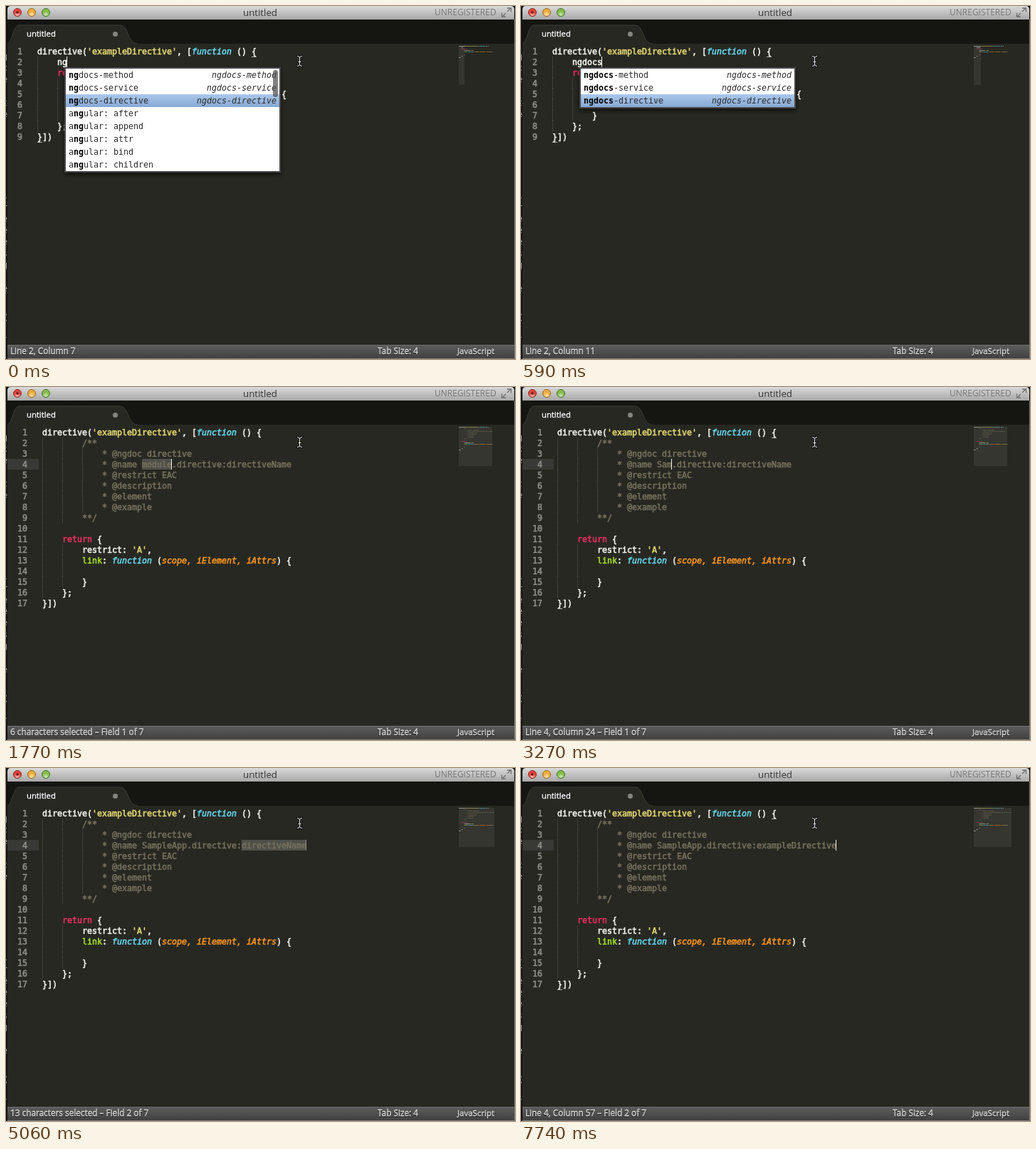
Write an HTML page that moves like this. It is 715 px wide and 496 px high and loops after 8000 ms.

```html
<!DOCTYPE html>
<html lang="en">
<head>
<meta charset="utf-8">
<title>untitled</title>
<style>
  html, body { margin: 0; width: 100%; height: 100%; overflow: hidden; background: #111; }
  svg { display: block; width: 715px; height: 496px; }
  text { white-space: pre; }
  .ui { font-family: "Open Sans", "Noto Sans", sans-serif; }
  .mono { font: 11.63px "DejaVu Sans Mono", monospace; }
  .code text { stroke-width: .55px; }
  .plain { fill: #f8f8f2; stroke: #f8f8f2; }
  .str { fill: #e6db74; stroke: #e6db74; }
  .func { fill: #66d9ef; stroke: #66d9ef; font-style: italic; }
  .key { fill: #ee2f63; stroke: #ee2f63; }
  .name { fill: #a6e22e; stroke: #a6e22e; }
  .arg { fill: #fd971f; stroke: #fd971f; font-style: italic; }
  .note { fill: #75715e; stroke: #75715e; }
  .num { fill: #8f908a; stroke: #8f908a; }
  .bright { fill: #fff; stroke: #fff; stroke-width: .3px; }
  .status { font-size: 11.8px; text-shadow: 0 1px 1px #222; }
  .match { font-weight: bold; fill: #000; }
  .map rect { stroke: none; opacity: .45; }
</style>
</head>
<body>
<svg viewBox="0 0 715 496">
  <defs>
    <linearGradient id="bar" x2="0" y2="1"><stop stop-color="#d9d9d9"/><stop offset="1" stop-color="#a8a8a8"/></linearGradient>
    <linearGradient id="foot" x2="0" y2="1"><stop stop-color="#5d5d5d"/><stop offset="1" stop-color="#414141"/></linearGradient>
    <linearGradient id="pick" x2="0" y2="1"><stop stop-color="#abc8ea"/><stop offset="1" stop-color="#86a8d4"/></linearGradient>
    <radialGradient id="gloss" cy=".85"><stop stop-color="#fff" stop-opacity=".65"/><stop offset="1" stop-color="#fff" stop-opacity="0"/></radialGradient>
    <filter id="shade" x="-10%" y="-10%" width="120%" height="130%"><feDropShadow dx="0" dy="3" stdDeviation="3" flood-opacity=".6"/></filter>
    <clipPath id="edge"><path d="M0 0h2v496H0z"/></clipPath>
  </defs>

  <rect width="715" height="496" fill="#111"/>
  <g id="behind" class="mono" clip-path="url(#edge)" fill="#aaa"></g>
  <path d="M714.500 19V495.500H2" fill="none" stroke="#808080"/>
  <rect x="2" y="19" width="712" height="35" fill="#151612"/>
  <path d="M2 53C10 50 9 27 19 27H160C173 27 170 53 185 53H714V477H2z" fill="#272822"/>
  <path d="M2 53C10 50 9 27 19 27H160C173 27 170 53 185 53" fill="none" stroke="#3c3d37"/>

  <path d="M2 19V5Q2 0 7 0H709Q714 0 714 5V19z" fill="url(#bar)"/>
  <g id="lights"></g>
  <g class="ui">
    <text x="357" y="14" text-anchor="middle" font-size="13.3" fill="#333">untitled</text>
    <text x="602" y="13" font-size="12" fill="#777">UNREGISTERED</text>
    <text class="bright" x="29" y="43" font-size="11.3">untitled</text>
  </g>
  <path d="M704 8L709 3M704 3h5.500v5.500M702 10L697 15M702 15h-5.500v-5.500" fill="none" stroke="#707070" stroke-width="1.300"/>
  <circle cx="153.500" cy="39.500" r="3.500" fill="#85857f"/>

  <g id="editor"></g>

  <rect x="2" y="476" width="712" height="19" fill="url(#foot)"/>
  <rect x="2" y="476" width="712" height="1" fill="#6c6c6c"/>
  <g class="ui status">
    <text class="bright" id="position" x="6" y="489"></text>
    <text class="bright" x="522" y="489">Tab Size: 4</text>
    <text class="bright" x="634" y="489" font-size="11.5">JavaScript</text>
  </g>
  <g id="popup" class="mono"></g>
  <g fill="none" stroke-linecap="square">
    <path id="beam" d="M409.500 70.500q3 0 3 2.500v9q0 2.500-3 2.500M415.500 70.500q-3 0-3 2.500v9q0 2.500 3 2.500M411 78.500h3"/>
    <use href="#beam" stroke="#111" stroke-width="3"/>
    <use href="#beam" stroke="#eee"/>
  </g>
</svg>
<script>
const LOOP = 8000, CHAR = 7, LINE = 15, TOP = 56, ROW = 18;
const $ = id => document.getElementById(id);
const escape = s => s.replace(/&/g, '&amp;').replace(/</g, '&lt;');
const text = (x, y, s, attrs = '') => `<text x="${x}" y="${y}" ${attrs}>${escape(s)}</text>`;
const rect = (x, y, w, h, fill, attrs = '') =>
  `<rect x="${x}" y="${y}" width="${w}" height="${h}" fill="${fill}" ${attrs}/>`;
const lineTop = i => TOP + i * LINE;

// A line is [indent, style, text, style, text, ...].
const opening = [0, 'plain', 'directive(', 'str', "'exampleDirective'", 'plain', ', [', 'func', 'function', 'plain', ' () {'];
const body = [
  [4, 'key', 'return', 'plain', ' {'],
  [8, 'plain', 'restrict: ', 'str', "'A'", 'plain', ','],
  [8, 'name', 'link', 'plain', ': ', 'func', 'function', 'plain', ' (', 'arg', 'scope, iElement, iAttrs', 'plain', ') {'],
  [8],
  [8, 'plain', '}'],
  [4, 'plain', '};'],
  [0, 'plain', '}])'],
];
const note = (indent, s) => [indent, 'note', s];
const shortDoc = typed => [opening, [4, 'plain', typed], ...body];
const longDoc = name => [
  opening,
  note(8, '/**'),
  ...['ngdoc directive', 'name ' + name, 'restrict EAC', 'description', 'element', 'example'].map(s => note(12, '* @' + s)),
  note(8, '**/'),
  [4],
  ...body,
];

const ngdocs = ['ngdocs-method', 'ngdocs-service', 'ngdocs-directive'];
const angular = (...names) => names.map(n => 'angular: ' + n);
const lists = {
  ng: [...ngdocs, ...angular('after', 'append', 'attr', 'bind', 'children')],
  ngd: [...ngdocs, ...angular('bind', 'children', 'data', 'detach', '$destroy')],
  ngdo: [...ngdocs, ...angular('$destroy')],
};

const complete = (typed, pick = 2) => ({ typed, pick });
const first = (name, more) => ({ name: name + '.directive:directiveName', caret: 20 + name.length, field: 1, ...more });
const second = (name, more) => ({ name: 'SampleApp.directive:' + name, caret: 40 + name.length, field: 2, ...more });
const module = blink => first('module', { selected: 6, blink });
const target = blink => second('directiveName', { selected: 13, blink });

const steps = [
  [0, complete('ng')], [150, complete('ngd')], [290, complete('ngdo')],
  [440, complete('ngdoc')], [590, complete('ngdocs')],
  ...[1, 0, 1, 0, 1, 2].map((pick, i) => [[890, 1040, 1180, 1330, 1480, 1620][i], complete('ngdocs', pick)]),
  [1770, module(1)], [2070, module(.66)], [2220, module(.33)], [2370, module(0)], [2820, module(.5)],
  ...[1, 2, 3, 4, 5, 6].map(n => [2820 + 150 * n, first('Sample'.slice(0, n))]),
  [4020, first('SampleA')], [4170, first('SampleAp')], [4460, first('SampleApp')],
  [4610, target(1)], [4910, target(.66)], [5060, target(.33)], [5200, target(0)],
  ...[1, 2, 3, 4, 5, 6, 7, 8, 9, 10, 11].map(n => [5500 + 150 * n, second('exampleDire'.slice(0, n))]),
  [7440, second('exampleDirect')], [7590, second('exampleDirectiv')], [7740, second('exampleDirective')],
];

function drawEditor(s) {
  const lines = s.typed ? shortDoc(s.typed) : longDoc(s.name);
  const left = s.typed ? 44 : 51;
  const caretLine = s.typed ? 1 : 3;
  const caret = s.typed ? 4 + s.typed.length : s.caret;
  const y = lineTop(caretLine);
  let code = '', map = '', guides = '', widest = 0;

  lines.forEach(([indent, ...parts], i) => {
    const top = lineTop(i);
    code += text(left - 21, top + 12, String(i + 1), 'class="num" text-anchor="end"');
    for (let c = 0; c < indent; c += 4) guides += `M${left + c * CHAR + .5} ${top}v${LINE}`;
    let col = indent;
    for (let p = 0; p < parts.length; p += 2) {
      const [style, str] = [parts[p], parts[p + 1]];
      code += text(left + col * CHAR, top + 12, str, `class="${style}"`);
      for (const word of str.matchAll(/\S+/g))
        map += `<rect class="${style}" x="${636 + (col + word.index) * .95}" y="${TOP + i * 2}" width="${word[0].length * .95}" height="1"/>`;
      col += str.length;
    }
    widest = Math.max(widest, col);
  });

  // The minimap's view keeps its width when the longest line shrinks.
  const right = s.typed ? 641 + caret / 2 : 633 + Math.max(widest, s.field === 2 ? 53 : 0);
  let under = '', marks = '';
  if (!s.typed) under += rect(2, y, 44, LINE, '#393935');
  if (s.selected) under += rect(left + (caret - s.selected) * CHAR, y, s.selected * CHAR, LINE, '#50504b');
  else marks = rect(left + 43 * CHAR, lineTop(0) + 15, CHAR, 1, '#b5b5aa') +
    rect(left, lineTop(lines.length - 1) + 15, CHAR, 1, '#b5b5aa');

  $('editor').innerHTML = under +
    `<path d="${guides}" stroke="#55564f" stroke-dasharray="1 1"/>` +
    `<g class="mono code">${code}</g>` + marks +
    rect(left + caret * CHAR - 1, y, 1, LINE, '#f8f8f0', `opacity="${s.blink ?? 1}"`) +
    rect(636, TOP, right - 636, 55, '#353630') + `<g class="map">${map}</g>`;

  $('position').textContent = (s.selected
    ? `${s.selected} characters selected`
    : `Line ${caretLine + 1}, Column ${caret + 1}`) + (s.field ? ` – Field ${s.field} of 7` : '');
}

// Bold the letters that match the typed ones in order.
function highlight(item, typed) {
  let n = 0;
  return [...item].map(ch => ch === typed[n]
    ? (n++, `<tspan class="match">${ch}</tspan>`) : ch).join('');
}

function drawPopup({ typed, pick }) {
  if (!typed) return void ($('popup').innerHTML = '');
  const items = lists[typed] || ngdocs;
  const height = items.length * ROW;
  let out = rect(82, 86, 304, height + 4, '#48464a', 'filter="url(#shade)"') + rect(84, 88, 300, height, '#fff');
  items.forEach((item, i) => {
    const y = 88 + i * ROW;
    if (i === pick) out += rect(84, y, 300, ROW, 'url(#pick)');
    out += `<text x="88" y="${y + 13}" fill="#2a2a2a">${highlight(item, typed)}</text>`;
    if (i < 3) out += text(380, y + 13, item, 'text-anchor="end" font-style="italic" fill="#2a2a2a"');
  });
  if (items.length > 7) out += rect(375, 90, 7, 38, '#555', 'rx="3.5" opacity=".75"');
  $('popup').innerHTML = out;
}

$('lights').innerHTML = [['#e2453c', '#8e2a24'], ['#f0ae3c', '#93661c'], ['#83bd4a', '#48702a']].map(([fill, rim], i) => {
  const at = `cx="${16 + 20 * i}" cy="9"`;
  return `<circle ${at} r="5.5" fill="${fill}" stroke="${rim}"/><circle ${at} r="5" fill="url(#gloss)"/>` +
    (i ? '' : `<circle ${at} r="1.8" fill="#6b1512"/>`);
}).join('');

$('behind').innerHTML = [...'- gce te: ', ...'    lreeesg:e \\/l'].map((ch, i) =>
  text(-5, 42 + i * 16.3, ch)).join('');

const start = performance.now();
let shown = -1;
function tick() {
  const time = (performance.now() - start) % LOOP;
  const now = steps.findLastIndex(([at]) => at <= time);
  if (now !== shown) {
    shown = now;
    drawEditor(steps[now][1]);
    drawPopup(steps[now][1]);
  }
  requestAnimationFrame(tick);
}
tick();
</script>
</body>
</html>
```
